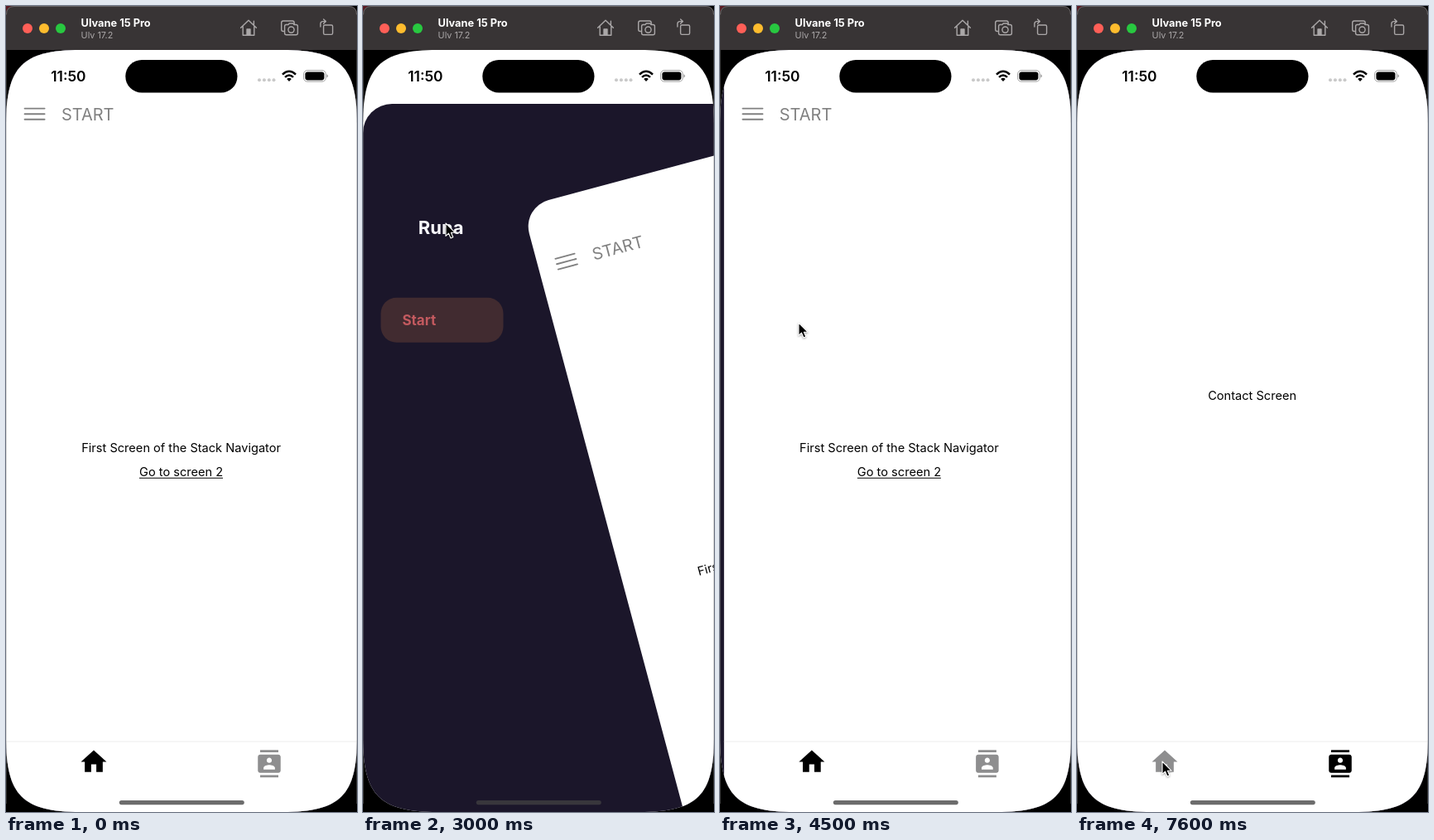
An HTML page that plays this animation: 424 px wide and 972 px high, repeating every 8 s.

```html
<!DOCTYPE html>
<html lang="en">
<head>
<meta charset="utf-8">
<title>Drawer navigation</title>
<style>
html, body { margin: 0; width: 100%; height: 100%; overflow: hidden; background: #000; }
svg { display: block; width: 100vw; height: 100vh; }
text { font-family: Inter, "Open Sans", sans-serif; white-space: pre; }
.line { fill: none; stroke-linecap: round; stroke-linejoin: round; }
</style>
</head>
<body>
<svg viewBox="0 0 424 972">
  <defs>
    <clipPath id="glass">
      <path d="M0 143C0 73 20 53 90 53H334C404 53 424 73 424 143V882C424 952 404 972 334 972H90C20 972 0 952 0 882Z"/>
    </clipPath>
  </defs>
  <rect width="424" height="972"/>
  <path d="M0 0H10L0 10Z" fill="#5b1a22"/>

  <!-- window title bar -->
  <path d="M0 53V10Q0 0 10 0H414Q424 0 424 10V53Z" fill="#383435"/>
  <path class="line" d="M.5 10Q.5 .5 10 .5H414Q423.5 .5 423.5 10" stroke="#676364"/>
  <circle cx="26" cy="27" r="6" fill="#ff5f57"/>
  <circle cx="46" cy="27" r="6" fill="#febc2e"/>
  <circle cx="66" cy="27" r="6" fill="#28c840"/>
  <g id="glyphs" opacity=".55">
    <path class="line" d="M23.7 24.7l4.6 4.6m0-4.6l-4.6 4.6M42.7 27h6.6" stroke="#000" stroke-width="1.3"/>
    <path d="M63.2 25.6v4.2h4.2zM68.8 28.4v-4.2h-4.2z"/>
  </g>
  <text x="90.6" y="25" font-size="12.8" font-weight="700" fill="#fff">Ulvane 15 Pro</text>
  <text x="90.6" y="39" font-size="10.8" fill="#aba8a9">Ulv 17.2</text>
  <g class="line" stroke="#aaa7a8" stroke-width="1.4">
    <path d="M283.6 26.3L293 17.3L302.4 26.3M286.2 24.5V35.2H299.8V24.5M299.4 22.5V18.3"/>
    <path d="M291 35V28H295V35Z" fill="#aaa7a8"/>
    <rect x="332.7" y="18" width="15.5" height="12.5" rx="2.2"/>
    <path d="M338.5 22.5H341L342.2 21H346.8L348 22.5H350.3Q352.4 22.5 352.4 24.6V32.8Q352.4 34.8 350.3 34.8H338.7Q336.6 34.8 336.6 32.8V24.6Q336.6 22.5 338.5 22.5Z" fill="#383435"/>
    <circle cx="344.5" cy="28.6" r="3.6"/>
    <rect x="383.6" y="23" width="11" height="11.4" rx="1.6"/>
    <path d="M379.9 25V21.5Q379.9 18.6 382.8 18.6H386.2M383.6 16L386.4 18.6L383.6 21.2"/>
  </g>

  <g clip-path="url(#glass)">
    <rect y="53" width="424" height="919" fill="#fff"/>

    <g id="drawer">
      <path id="panel" fill="#1b162a"/>
      <text x="66.8" y="209.5" font-size="22" font-weight="700" fill="#f7f7fb">Runa</text>
      <rect x="21.5" y="286.7" width="148" height="54" rx="19" fill="#412b30"/>
      <text id="entry" x="47.4" y="320" font-size="17" font-weight="700" fill="#c35a5f">Start</text>
    </g>

    <g id="card">
      <rect id="sheet" y="53" width="424" height="919" fill="#fff"/>
      <g id="start">
        <path id="menu" class="line" d="M22.6 123.6H46.6M22.6 130.2H46.6M22.6 136.8H46.6" stroke="#808080" stroke-width="1.9"/>
        <text x="67" y="137.5" font-size="20" fill="#808080">START</text>
        <text x="211.6" y="537.5" font-size="14.6" text-anchor="middle">First Screen of the Stack Navigator</text>
        <text x="211.6" y="567" font-size="14.6" text-anchor="middle">Go to screen 2</text>
        <path d="M161 569.3H262" stroke="#000" stroke-width="1.1"/>
      </g>
      <text id="contact" x="211.6" y="475" font-size="14.6" text-anchor="middle">Contact Screen</text>
      <path d="M0 887H424" stroke="#ececec"/>
      <path id="homeTab" transform="translate(87.4 892.8) scale(1.55)" d="M10 20v-6h4v6h5v-8h3L12 3 2 12h3v8z"/>
      <path id="contactTab" transform="translate(301.5 897.3) scale(1.375)" d="M20 0H4v2h16V0zM4 24h16v-2H4v2zM20 4H4c-1.1 0-2 .9-2 2v12c0 1.1.9 2 2 2h16c1.1 0 2-.9 2-2V6c0-1.1-.9-2-2-2zm-8 2.75c1.24 0 2.25 1.01 2.25 2.25s-1.01 2.25-2.25 2.25S9.75 10.24 9.75 9 10.76 6.75 12 6.75zM17 17H7v-1.5c0-1.67 3.33-2.5 5-2.5s5 .83 5 2.5V17z"/>
    </g>

    <!-- status bar -->
    <text x="54.2" y="91" font-size="17.4" font-weight="600">11:50</text>
    <rect x="144.3" y="65" width="135.2" height="39.6" rx="19.8"/>
    <g fill="#c9c9c9">
      <circle cx="306" cy="89.2" r="2"/><circle cx="311.9" cy="89.2" r="2"/>
      <circle cx="317.8" cy="89.2" r="2"/><circle cx="323.5" cy="89.2" r="2"/>
    </g>
    <path d="M334 82.6Q342 75 350 82.6M337 85.9Q342 81.2 347 85.9" fill="none" stroke="#000" stroke-width="2.5"/>
    <path d="M339.2 88.1Q342 85.6 344.8 88.1L342 91Z"/>
    <rect x="359.6" y="77.7" width="26.6" height="13.4" rx="4.2" fill="none" stroke="#a0a0a0"/>
    <rect x="361.4" y="79.4" width="23" height="10" rx="2.8"/>
    <path d="M387.4 82.2Q389 82.8 389 84.4T387.4 86.6Z" fill="#a0a0a0"/>
    <rect id="grip" x="136.8" y="958" width="151" height="5.2" rx="2.6"/>
  </g>

  <path d="M.5 53V962M423.5 53V962" stroke="#888" stroke-opacity=".35"/>
  <path id="cursor" d="M0 0V15.4L3.5 12.2L6 18L8.8 16.8L6.4 11.2H11Z" stroke="#fff" stroke-width="1.1" stroke-linejoin="round" style="filter:drop-shadow(0 1px 1px rgba(0,0,0,.35))"/>
</svg>
<script>
const LOOP = 8000, STEP = 100;
const $ = id => document.getElementById(id);
const set = (id, attrs) => {
  for (const key in attrs) $(id).setAttribute(key, attrs[key]);
};
const show = (id, on) => set(id, { visibility: on ? 'visible' : 'hidden' });

// Rows are [time, value, ...]; values are interpolated between rows.
function track(rows, t) {
  if (t <= rows[0][0]) return rows[0].slice(1);
  const i = rows.findIndex(row => row[0] > t);
  if (i < 0) return rows[rows.length - 1].slice(1);
  const a = rows[i - 1], b = rows[i];
  const k = (t - a[0]) / (b[0] - a[0]);
  return a.slice(1).map((v, n) => v + (b[n + 1] - v) * k);
}

// Drawer tilt and slide; the slide settles slightly later.
const drawerKeys = [
  [2200, 0, 0], [2300, .4, .38], [2400, .95, .921], [2500, .99, .98], [2700, 1, 1],
  [4200, 1, 1], [4300, .5, .54], [4400, .06, .11], [4500, 0, .016], [4600, 0, 0]
];
const menuKeys = [[2100, 1], [2200, .22], [2400, 1]];
const entryKeys = [[4100, 1], [4200, .33], [4400, 1]];

const cursorKeys = [
  [100, 2, 8], [200, 20.5, 15.5], [300, 20.5, 15.5], [500, 250, 420], [600, 330, 740],
  [700, 338, 890], [800, 295, 905], [1000, 90, 320], [1100, 42, 175], [1200, 28, 138],
  [1300, 28, 138], [1500, 32, 136],
  [2700, 32, 136], [3000, 100, 262], [3200, 325, 770], [3300, 346, 839], [3500, 180, 490],
  [3600, 89, 376], [3700, 95, 382],
  [4700, 95, 382], [5000, 153, 493], [5300, 207, 623], [5500, 207.5, 597],
  [5600, 207.5, 597], [5900, 310, 860], [6000, 334, 912], [6100, 326, 914.5],
  [6600, 326, 914.5], [7000, 215, 903], [7300, 91, 909], [7400, 103, 911]
];

function draw(t) {
  const [tilt, slide] = track(drawerKeys, t);
  const onContact = t >= 6400;
  const r = 35 * tilt;

  set('drawer', { transform: `translate(0 ${65 * tilt})` });
  set('panel', { d: `M0 972V${53 + r}Q0 53 ${r} 53H424V972Z` });
  if (r) set('panel', { d: `M0 972V${53 + r}A${r} ${r} 0 0 1 ${r} 53H424V972Z` });
  set('card', { transform: `translate(${304 * slide} ${119 * tilt}) rotate(${-15 * tilt} 212 512.5)` });
  set('sheet', { rx: 33 * tilt });
  set('menu', { opacity: track(menuKeys, t)[0] });
  set('entry', { opacity: track(entryKeys, t)[0] });

  show('start', !onContact);
  show('contact', onContact);
  set('homeTab', { fill: onContact ? '#8e8e8f' : '#000' });
  set('contactTab', { fill: onContact ? '#000' : '#8e8e8f' });
  set('grip', { fill: slide > .5 ? '#38363c' : '#6c6c6c' });

  const [x, y] = track(cursorKeys, t);
  show('glyphs', t >= 200 && t < 400);
  show('cursor', t >= 100);
  set('cursor', { transform: `translate(${x} ${y})` });
}

function tick() {
  const t = performance.now() % LOOP;
  draw(Math.floor(t / STEP) * STEP);
  requestAnimationFrame(tick);
}
tick();
</script>
</body>
</html>
```
